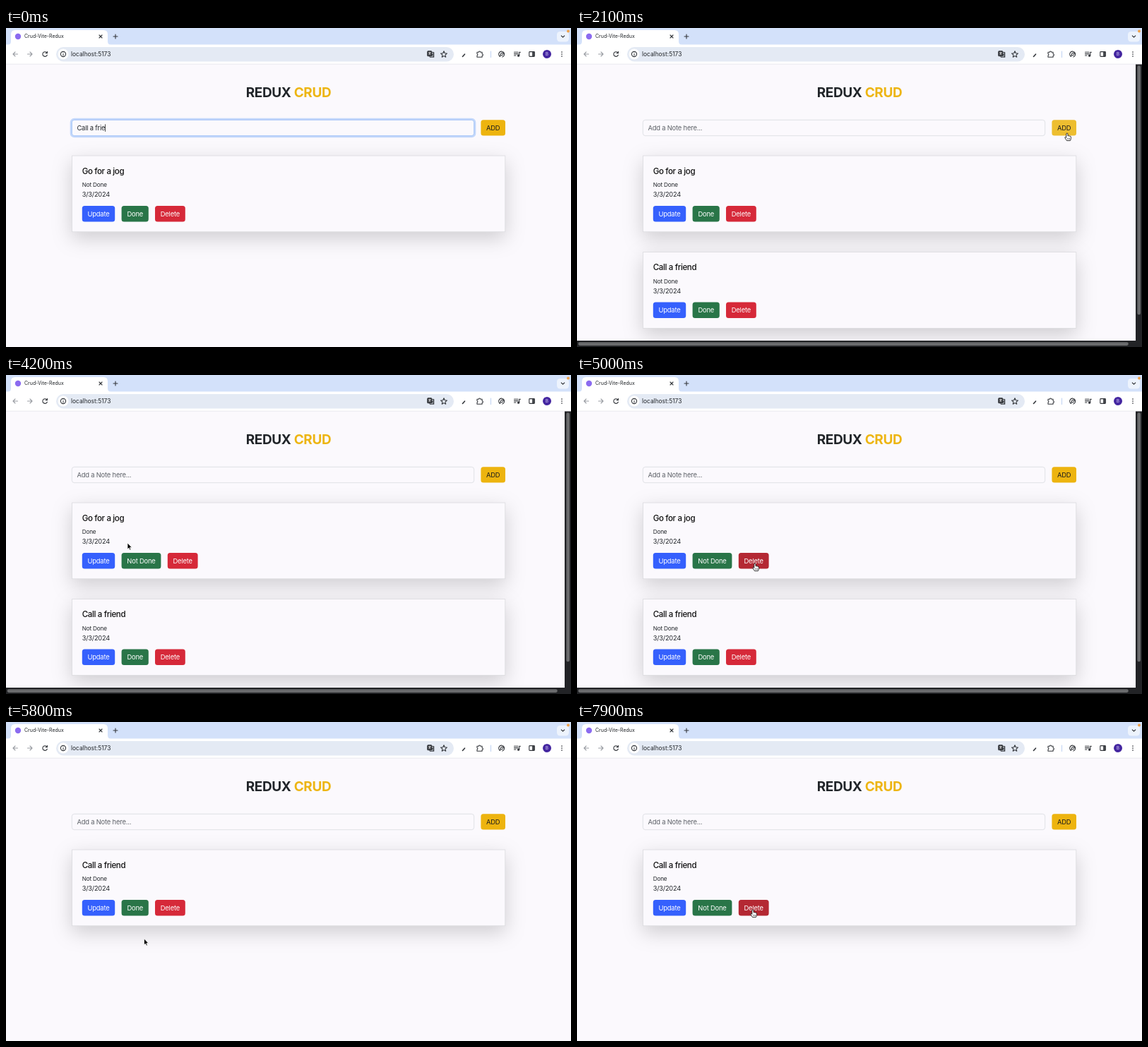
These frames come from a looping animation (800 px wide and 452 px high, 8000 ms). An HTML page:

```html
<!DOCTYPE html>
<html lang="en">
<head>
<meta charset="utf-8">
<title>Crud-Vite-Redux</title>
<style>
  html, body { margin: 0; width: 100%; height: 100%; overflow: hidden; background: #fbf9fd; }
  svg { display: block; width: 800px; height: 452px; }
  text { font: 9.4px Inter, sans-serif; letter-spacing: -.02em; fill: #212529; white-space: pre; }
  .heading { font-size: 19px; font-weight: 700; text-anchor: middle; }
  .tab { font-size: 7px; letter-spacing: 0; }
  .url { font-size: 8.4px; letter-spacing: 0; }
  .name { font-size: 11.5px; font-weight: 500; letter-spacing: -.03em; fill: #111; }
  .status { font-size: 8.2px; }
  .date { font-size: 9.2px; }
  .label { text-anchor: middle; }
  .card { fill: #fbf9fd; stroke: #dadade; stroke-width: .8; filter: drop-shadow(0 9.4px 14px rgba(0, 0, 0, .175)); }
  .icon { fill: none; stroke: #33363b; stroke-width: 1.1; stroke-linecap: round; stroke-linejoin: round; }
  .pale { stroke: #9a9da3; }
</style>
</head>
<body>
<svg viewBox="0 0 800 452">
  <rect width="800" height="452" fill="#fbf9fd"/>
  <text class="heading" x="400" y="98">REDUX <tspan fill="#edb512">CRUD</tspan></text>
  <g id="page"></g>

  <rect width="800" height="24" fill="#d3e1fa"/>
  <rect y="23.5" width="800" height="27.5" fill="#fff"/>
  <path d="M0 51.2H800" stroke="#e6e6ec" stroke-width=".8"/>
  <path d="M2 24Q7 24 7 19V9Q7 3 13 3H138Q144 3 144 9V19Q144 24 149 24Z" fill="#fff"/>
  <circle cx="17" cy="12" r="4.2" fill="#8b6bf0"/>
  <text class="tab" x="26" y="14.4">Crud-Vite-Redux</text>
  <rect x="780" y="5" width="17" height="14.5" rx="4.5" fill="#edf3fd"/>
  <circle cx="796" cy="4.5" r="2" fill="#f0a24a"/>
  <rect x="71" y="27" width="563" height="20.5" rx="10.2" fill="#e4eaf4"/>
  <circle cx="81" cy="37" r="7.5" fill="#fff"/>
  <text class="url" x="92" y="40.1">localhost:5173</text>

  <g class="icon">
    <path d="M132 10l4 4m0-4l-4 4M155 9v6m-3-3h6M786.3 11l2.2 2.2 2.2-2.2"/>
    <path class="pale" d="M16.5 37H10m3-3l-3 3 3 3M30.5 37H37m-3-3l3 3-3 3"/>
    <path d="M58 35.3A3.3 3.3 0 1 0 58.3 38.2M58.4 33.4v2.3h-2.3"/>
    <circle cx="81" cy="37" r="3.6"/>
    <path d="M81 37v1.7M81 35.2v.1"/>
    <rect x="596.8" y="32.8" width="6" height="7" rx="1" fill="#33363b"/>
    <path d="M603 34.5h2.7v6.7h-5.2l-.8-1.4M602.8 36.5l2 3.2m0-3.2l-2 3.2"/>
    <path d="M598.3 35h3m-1.5-.8v.8m1 0q-.5 2-2.2 2.8m.4-1.8l1.8 1.8" stroke="#fff" stroke-width=".7"/>
    <path d="M620 32.8l1.3 2.9 3.1.3-2.4 2.1.7 3.1-2.7-1.6-2.7 1.6.7-3.1-2.4-2.1 3.1-.3Z"/>
    <path d="M646.5 40.5l3-3.3" stroke-width="1.6"/>
    <path d="M667 34.3h2.3a1.3 1.3 0 0 1 2.6 0h2.2v2.5a1.3 1.3 0 0 1 0 2.6v1.9H667v-2.2a1.4 1.4 0 0 0 0-2.6Z"/>
    <path d="M686.5 33v8.5" stroke="#c3d5f2"/>
    <path d="M699.5 40.5a4 4 0 1 1 3.3.5M700.3 38.6q-.4-3.6 4-3.5 0 4.4-4 3.5l-1 1.6"/>
    <path d="M719.5 34.2h5.5m-5.5 2.4h5.5m-5.5 2.4h2.6M726.8 39v-4.6h1.4"/>
    <circle cx="725.6" cy="39.2" r="1.1" fill="#33363b"/>
    <rect x="740.8" y="33.6" width="7.6" height="6.8" rx=".8"/>
    <path d="M746.5 34v6" stroke-width="2.6" stroke-linecap="butt"/>
    <path d="M787 34v.01M787 37v.01M787 40v.01" stroke-width="1.7"/>
  </g>
  <circle cx="766" cy="37" r="6" fill="#4426a0"/>
  <text x="766" y="39.2" class="label" style="font-size:6px;fill:#e4dcff">B</text>

  <g id="scrollbars">
    <path d="M791 51.5h9V452H0v-9h791Z" fill="#222326"/>
    <path d="M795.7 55.5V404M4 447.6H778.5" stroke="#696a6c" stroke-width="4.6" stroke-linecap="round"/>
  </g>
  <g id="cursor" stroke-linejoin="round">
    <path id="arrow" d="M0 0V8.8L2 7 3.3 10 4.8 9.4 3.5 6.4H6.2Z" stroke="#fff" stroke-width=".7"/>
    <g id="hand" stroke="#111" stroke-width=".85">
      <path fill="#fff" d="M-1.2 1.2a1.1 1.1 0 0 1 2.2 0V3.8q.9-.6 1.6.2.9-.4 1.5.4 1.3-.2 1.3 1.2V7.5Q5.2 9 4.4 10.6H-.6Q-1.6 8.8-3 6.8-3.6 5.6-2.6 5.4-1.8 5.5-1.2 6.4Z"/>
      <path fill="none" stroke-width=".5" d="M.7 7v2M2.1 7v2M3.5 7v2"/>
    </g>
  </g>
</svg>
<script>
const LOOP = 8000, STEP = 100, CARD_GAP = 136.6;
const ADDED = 1500, FIRST_DONE = 3600, FIRST_DELETED = 5300, SECOND_DONE = 7000;
const SHOW_CURSOR = 600;

// time, x, y of the pointer tip
const route = [
  [600, 203, 257], [1150, 694, 149], [2200, 694, 149], [2650, 235, 392], [2800, 200, 396],
  [2950, 196, 396], [3300, 186, 270], [4050, 186, 270], [4200, 172, 238], [4400, 134, 222],
  [4600, 134, 222], [4850, 252, 267], [5350, 252, 267], [5750, 195.5, 307], [6000, 195.5, 307],
  [6400, 186, 266], [7050, 186, 266], [7400, 249, 266], [8000, 249, 266]
];
const colors = {
  add: ['#edb40f', '#edbe30'],
  update: ['#3560fd', '#2d52d8'],
  done: ['#297548', '#23613d'],
  remove: ['#d62939', '#b42833']
};
const [page, scrollbars, cursor, arrow, hand] =
  ['page', 'scrollbars', 'cursor', 'arrow', 'hand'].map(id => document.getElementById(id));

function pointerAt(t) {
  const i = Math.max(1, route.findIndex(p => p[0] > t));
  const [t0, x0, y0] = route[i - 1], [t1, x1, y1] = route[i];
  const k = Math.min(1, Math.max(0, (t - t0) / (t1 - t0)));
  const e = k * k * (3 - 2 * k);
  return { x: x0 + (x1 - x0) * e, y: y0 + (y1 - y0) * e };
}

function cardsAt(t) {
  const cards = [];
  if (t < FIRST_DELETED) cards.push({ name: 'Go for a jog', done: t >= FIRST_DONE });
  if (t >= ADDED) cards.push({ name: 'Call a friend', done: t >= SECOND_DONE });
  return cards;
}

function render(t) {
  const pointer = pointerAt(t), visible = t >= SHOW_CURSOR;
  let overButton = false;

  function button(kind, label, x, y, width) {
    const over = visible && pointer.x >= x && pointer.x <= x + width &&
      pointer.y >= y && pointer.y <= y + 22.4;
    overButton ||= over;
    return `<rect x="${x}" y="${y}" width="${width}" height="22.4" rx="3.5" fill="${colors[kind][+over]}"/>
      <text class="label" x="${x + width / 2}" y="${y + 14.7}" style="fill:${kind === 'add' ? '#1c1c1c' : '#fff'}">${label}</text>`;
  }

  function card({ name, done }, index) {
    const y = 181 + index * CARD_GAP;
    return `<rect class="card" x="93.4" y="${y}" width="613.4" height="107.8"/>
      <text class="name" x="107.7" y="${y + 25.7}">${name}</text>
      <text class="status" x="107.7" y="${y + 44}">${done ? 'Done' : 'Not Done'}</text>
      <text class="date" x="107.7" y="${y + 58}">3/3/2024</text>` +
      button('update', 'Update', 107.8, y + 71, 46.4) +
      button('done', done ? 'Not Done' : 'Done', 163.6, y + 71, done ? 55.8 : 38.2) +
      button('remove', 'Delete', done ? 228.8 : 211, y + 71, 42.8);
  }

  function input() {
    const focused = t < ADDED;
    const typed = 'Call a friend'.slice(0, t < 100 ? 11 : t < 300 ? 12 : 13);
    const ring = focused
      ? '<rect x="92" y="129" width="572" height="25" rx="4.6" fill="none" stroke="#c4d8fb" stroke-width="2.6"/>' : '';
    return `${ring}<rect x="93.3" y="130.3" width="569.4" height="22.4" rx="3.5" fill="#fbf9fd"
        stroke="${focused ? '#8fb8f5' : '#d9dbe0'}" stroke-width=".8"/>
      <text id="entry" x="100.4" y="145" ${focused ? '' : 'style="fill:#5d6167"'}>${focused ? typed : 'Add a Note here...'}</text>`;
  }

  const cards = cardsAt(t);
  page.innerHTML = input() + button('add', 'ADD', 672.4, 130.2, 34.6) + cards.map(card).join('');

  const caretOn = t < 800 || (t >= 1400 && t < ADDED);
  if (caretOn) {
    const x = 100.6 + document.getElementById('entry').getComputedTextLength();
    page.insertAdjacentHTML('beforeend', `<path d="M${x} 136.3v10.6" stroke="#222" stroke-width=".8"/>`);
  }

  const show = (node, on) => node.style.display = on ? '' : 'none';
  show(scrollbars, cards.length > 1);
  show(cursor, visible);
  show(hand, overButton);
  show(arrow, !overButton);
  cursor.setAttribute('transform', `translate(${pointer.x} ${pointer.y})`);
}

let last = -1;
function tick() {
  const t = Math.floor(performance.now() % LOOP / STEP) * STEP;
  if (t !== last) render(last = t);
  requestAnimationFrame(tick);
}
tick();
</script>
</body>
</html>
```
